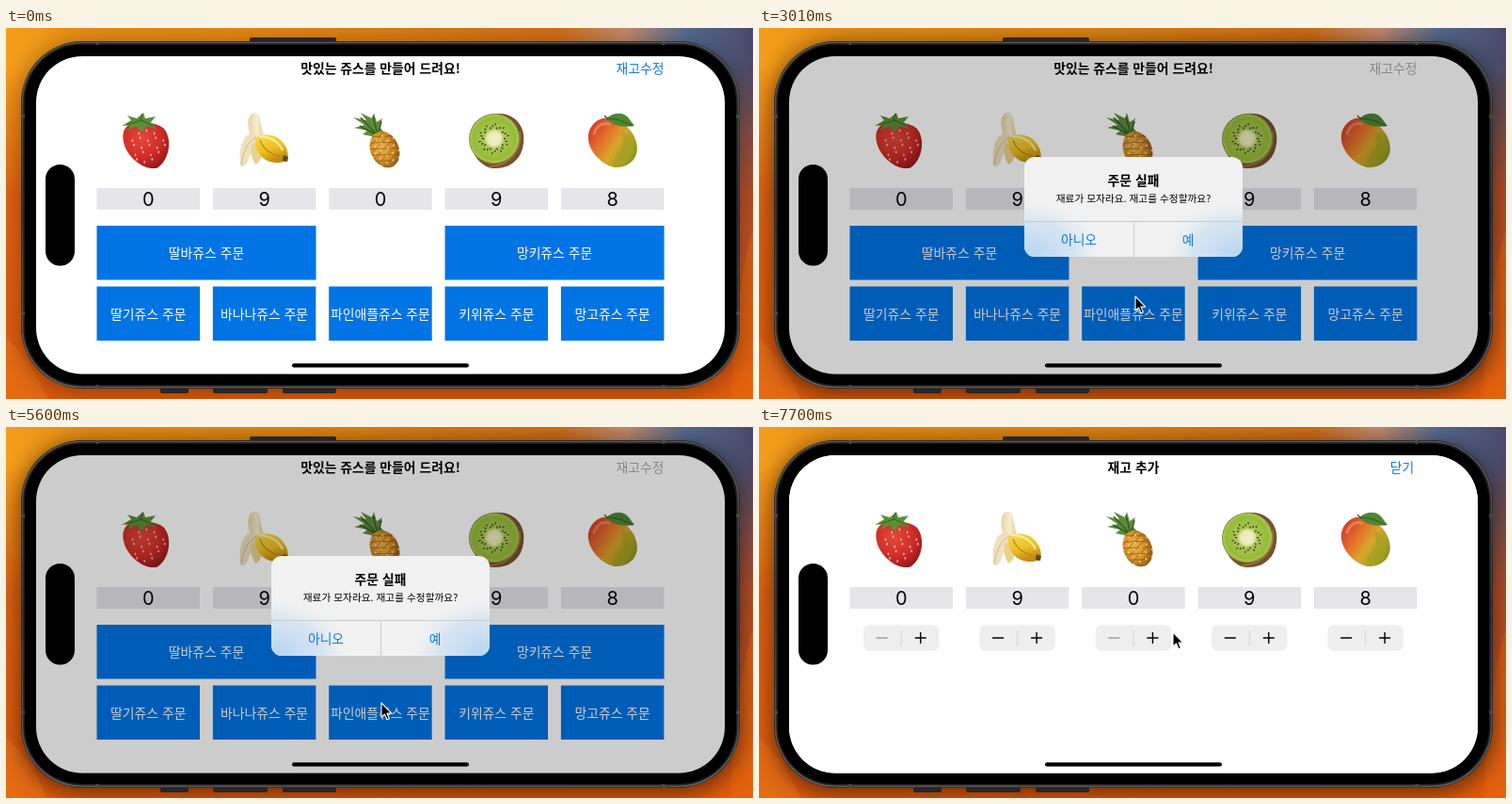
An HTML page that plays this animation: 794x394 px, repeating every 8000 ms.

```html
<!DOCTYPE html>
<html lang="ko">
<head>
<meta charset="utf-8">
<title>쥬스 주문</title>
<style>
html, body { margin: 0; width: 100%; height: 100%; overflow: hidden; background: #c4630f; }
svg { display: block; width: 794px; height: 394px; }
text { font: 13.85px "Noto Sans CJK KR", "Noto Sans CJK", sans-serif; text-anchor: middle; }
.bold { font-weight: 600; }
.num { font: 20px Inter, sans-serif; }
.btn { fill: #0074e4; }
.lbl { fill: #fff; }
.link { fill: #0a7ae0; }
</style>
</head>
<body>
<svg viewBox="0 0 794 394">
  <defs>
    <linearGradient id="wall" x2="1">
      <stop offset="0" stop-color="#f59d1c"/><stop offset=".12" stop-color="#e58c15"/>
      <stop offset=".45" stop-color="#dc8212"/><stop offset=".74" stop-color="#cf6d18"/>
      <stop offset=".83" stop-color="#c38a6c"/><stop offset=".91" stop-color="#566a90"/>
      <stop offset="1" stop-color="#4a4868"/>
    </linearGradient>
    <linearGradient id="low" x2="0" y2="1">
      <stop offset=".1" stop-color="#d9570d" stop-opacity="0"/><stop offset=".45" stop-color="#d8500f" stop-opacity=".75"/>
      <stop offset="1" stop-color="#e25c0c"/>
    </linearGradient>
    <linearGradient id="rim" x2="0" y2="1">
      <stop offset="0" stop-color="#5a5a5c"/><stop offset=".5" stop-color="#3a3a3c"/><stop offset="1" stop-color="#66605c"/>
    </linearGradient>
    <radialGradient id="red" cx=".4" cy=".35" r=".7">
      <stop offset="0" stop-color="#e5483c"/><stop offset=".6" stop-color="#cf2c28"/><stop offset="1" stop-color="#961a1c"/>
    </radialGradient>
    <linearGradient id="peel" x2=".4" y2="1">
      <stop offset="0" stop-color="#f7dc55"/><stop offset=".6" stop-color="#eebf22"/><stop offset="1" stop-color="#c38c14"/>
    </linearGradient>
    <linearGradient id="flesh" x2="1">
      <stop offset="0" stop-color="#e4d2a8"/><stop offset=".5" stop-color="#f8edcf"/><stop offset="1" stop-color="#dcc592"/>
    </linearGradient>
    <radialGradient id="pine" cx=".4" cy=".4" r=".65">
      <stop offset="0" stop-color="#edb64a"/><stop offset=".6" stop-color="#d4902a"/><stop offset="1" stop-color="#8d561a"/>
    </radialGradient>
    <radialGradient id="kiwi">
      <stop offset="0" stop-color="#f3f0cb"/><stop offset=".27" stop-color="#e9ebb5"/><stop offset=".42" stop-color="#a9c552"/>
      <stop offset=".85" stop-color="#94bb35"/><stop offset="1" stop-color="#b5c860"/>
    </radialGradient>
    <linearGradient id="mango" x1=".1" y1=".2" x2=".9" y2=".75">
      <stop offset="0" stop-color="#d6452a"/><stop offset=".35" stop-color="#e5772a"/>
      <stop offset=".6" stop-color="#d9a52a"/><stop offset="1" stop-color="#8f9a22"/>
    </linearGradient>
    <radialGradient id="tint">
      <stop offset="0" stop-color="#b9d6f1"/><stop offset=".6" stop-color="#cfe1f2" stop-opacity=".8"/><stop offset="1" stop-color="#e8eef3" stop-opacity="0"/>
    </radialGradient>
    <filter id="soft" x="-10%" y="-20%" width="120%" height="140%"><feGaussianBlur stdDeviation="11"/></filter>
    <clipPath id="screen"><rect x="32" y="30" width="732" height="337.5" rx="49"/></clipPath>
    <clipPath id="card"><rect x="282" y="137" width="232" height="106" rx="11"/></clipPath>
    <g id="stock"></g>
  </defs>

  <rect width="794" height="394" fill="url(#wall)"/>
  <rect width="794" height="394" fill="url(#low)"/>
  <path d="M0 330Q26 352 44 394H0Z" fill="#e8791c" opacity=".5"/>
  <path d="M794 215Q778 260 770 394H794Z" fill="#e8690f" opacity=".5"/>
  <rect id="shadow" x="14" y="16" width="768" height="374" rx="66" filter="url(#soft)"/>

  <g fill="#2c2522">
    <rect x="259" y="10" width="92" height="8" rx="2"/>
    <rect x="164" y="380" width="30" height="8" rx="2"/>
    <rect x="220" y="380" width="58" height="8" rx="2"/>
    <rect x="294" y="380" width="57" height="8" rx="2"/>
  </g>
  <rect x="16" y="14" width="764" height="369" rx="65" fill="#1d1d1f"/>
  <rect x="17.5" y="15.5" width="761" height="366" rx="63.5" fill="none" stroke="url(#rim)" stroke-width="1.6"/>
  <rect x="20" y="18" width="756" height="361" rx="61"/>
  <path d="M97 14v4M699 14v4M97 379v4M699 379v4M16 94h4M776 94h4M16 303h4M776 303h4" stroke="#4a4a4a" stroke-width="3"/>

  <g clip-path="url(#screen)">
    <rect x="32" y="30" width="732" height="338" fill="#fff"/>
    <text class="bold" x="398" y="47.8">맛있는 쥬스를 만들어 드려요!</text>
    <text id="edit" x="674" y="47.8">재고수정</text>
    <use href="#stock"/>
    <g id="orders"></g>
    <rect id="dim" x="32" y="30" width="732" height="338"/>
    <g id="alert">
      <g clip-path="url(#card)">
        <rect x="282" y="137" width="232" height="106" fill="#f1f1f1"/>
        <ellipse cx="290" cy="240" rx="75" ry="58" fill="url(#tint)"/>
        <ellipse cx="506" cy="240" rx="75" ry="58" fill="url(#tint)"/>
        <rect id="press" y="206" width="116" height="37"/>
        <path d="M282 205.5H514M398.5 205.5V243" stroke="#c9cbcd"/>
      </g>
      <text class="bold" x="398" y="166.5">주문 실패</text>
      <text x="398" y="184.8" style="font-size:10.7px">재료가 모자라요. 재고를 수정할까요?</text>
      <text class="link" x="340" y="229.5">아니오</text>
      <text class="link" x="456" y="229.5">예</text>
    </g>
    <g id="sheet">
      <rect x="32" y="30" width="732" height="338" fill="#fff"/>
      <text class="bold" x="398" y="47.8">재고 추가</text>
      <text class="link" x="683.5" y="47.8">닫기</text>
      <use href="#stock"/>
      <g id="steppers"></g>
    </g>
  </g>
  <rect x="42" y="145" width="31" height="107.5" rx="15.5"/>
  <rect x="304" y="356.3" width="188" height="4.2" rx="2.1"/>
  <path id="cursor" d="M0 0V15.2L3.5 12L6 17.8L8.4 16.8L6 11.1H10.8Z" stroke="#fff" stroke-width="1.1" stroke-linejoin="round"/>
</svg>
<script>
const $ = id => document.getElementById(id);
const clamp = v => Math.max(0, Math.min(1, v));
const smooth = p => p * p * (3 - 2 * p);
const inOut = p => p < .5 ? 2 * p * p : 1 - 2 * (1 - p) ** 2;
const out = p => 1 - (1 - p) ** 3;
const ramp = (t, start, length, ease) => ease(clamp((t - start) / length));
const mix = (a, b, p) => a + (b - a) * p;
const range = (n, f) => Array.from({ length: n }, (_, i) => f(i)).join('');

const COUNTS = [0, 9, 0, 9, 8];
const colX = i => 96.5 + 123.35 * i;

function strawberry() {
  const seeds = range(26, i => {
    const row = Math.floor(i / 5), x = 133 + (i % 5) * 8.2 + row * 1.5, y = 109 + row * 7.6 + (i % 2) * 3;
    const inside = ((x - 150) / 20) ** 2 + ((y - 124) / 21) ** 2 < 1;
    return inside ? `<ellipse cx="${x}" cy="${y}" rx=".9" ry="1.4" fill="#f0b79a"/>` : '';
  });
  return `<path d="M128 105C136 98 160 99 168 107C177 118 174 140 161 148.5C148 152 130 139 125.500 123C123.500 116 124 109 128 105Z" fill="url(#red)"/>${seeds}
    <path d="M123 104L133 98L129 93L139 96L146 90L148 96L159 94L154 100L160 107L149 104L144 111L139 104L130 109L132 103Z" fill="#5d8f35"/>
    <path d="M128 103L144 98L156 104M143 98L145 91" stroke="#38682a" stroke-width="1.2" fill="none"/>`;
}

function banana() {
  return `<path d="M262 122C256 104 256 95 261 91C266 88 270 91 270 98L276 124Z" fill="url(#flesh)"/>
    <path d="M263 111C252 112 247 127 249 146C252 149 256 146 258 139C261 130 267 122 270 117Z" fill="#eee0bd"/>
    <path d="M250 145C252 131 257 121 266 116" fill="none" stroke="#cfb681"/>
    <path d="M263 122C258 128 260 136 265 145C271 142 273 134 273 128Z" fill="#ead28e"/>
    <path d="M265 117C274 110 290 113 296 124C300 130 301 138 298 141C290 145 277 143 271 136C267 131 264 124 265 117Z" fill="url(#peel)"/>
    <path d="M270 119C274 130 284 136 297 137" fill="none" stroke="#ba8b18" stroke-width="1.3"/>
    <path d="M269 115C281 115 290 121 294 130" fill="none" stroke="#fff0a0" stroke-width="2"/>
    <path d="M295 135L300 137L299 142L294 141Z" fill="#594b1b"/>`;
}

function pineapple() {
  const lines = range(6, i => `<path d="M-17 ${i * 7 - 22}L17 ${i * 7 - 8}M17 ${i * 7 - 22}L-17 ${i * 7 - 8}"/>`);
  const dots = range(20, i => `<circle cx="${(i % 4) * 7 - 10.5 + Math.floor(i / 4) % 2 * 3}" cy="${Math.floor(i / 4) * 7 - 14}" r="1" fill="#f7d277"/>`);
  return `<path d="M394 116L379 113L384 109L370 106L381 103L369 95L383 98L377 90L389 96L391 90L394 100L400 96L397 105L402 111Z" fill="#5f8b39"/>
    <path d="M393 113L376 104M394 113L377 95M395 113L390 94M396 112L399 99" stroke="#2f5e29" stroke-width="1.5"/>
    <g transform="translate(402.500 129) rotate(-24)"><clipPath id="fruit"><ellipse rx="15" ry="20"/></clipPath>
    <ellipse rx="15" ry="20" fill="url(#pine)"/><g clip-path="url(#fruit)"><g stroke="#8a551a" stroke-width=".8" opacity=".75">${lines}</g>${dots}</g></g>`;
}

function kiwi() {
  const seeds = range(30, i => {
    const a = i * Math.PI / 15, r = 11.5 + (i % 3) * 1.9;
    return `<ellipse cx="${r}" rx="1.3" ry=".65" fill="#29301a" transform="rotate(${a * 180 / Math.PI})"/>`;
  });
  return `<path d="M496 110C502 93 520 87 535 93C548 99 553 112 549 128C545 143 532 150 517 149C501 146 491 129 496 110Z" fill="#76512c"/>
    <path d="M546 110C549 130 535 146 514 147" fill="none" stroke="#92703f" stroke-width="2"/>
    <ellipse cx="519" cy="117.500" rx="26.500" ry="26" fill="url(#kiwi)" stroke="#8a9140" transform="rotate(-25 519 117.500)"/>
    <g transform="translate(518.500 117.500)">${seeds}</g>`;
}

function mango() {
  return `<path d="M619 113C621 100 634 92 646 97C660 101 671 114 671 129C670 142 659 149 646 148C631 144 617 128 619 113Z" fill="url(#mango)"/>
    <path d="M655 110C671 117 671 140 654 147C640 146 648 137 655 128C659 122 652 116 655 110Z" fill="#a5a322" opacity=".65"/>
    <path d="M625 112C628 103 635 100 641 102" fill="none" stroke="#f09a72" stroke-width="3" stroke-linecap="round" opacity=".6"/>
    <path d="M638 96C646 89 657 89 662 96L668 104C656 106 645 104 638 96Z" fill="#4f8732"/>
    <path d="M639 96Q652 96 666 104M640 97L636 93" stroke="#2e5c25" stroke-width="1.2" fill="none"/>`;
}

$('stock').innerHTML = strawberry() + banana() + pineapple() + kiwi() + mango() + COUNTS.map((n, i) =>
  `<rect x="${colX(i)}" y="170" width="109.500" height="23" fill="#e5e5ea"/>
   <text class="num" x="${colX(i) + 54.75}" y="188.700">${n}</text>`).join('');

const button = (x, y, w, label, id = '') =>
  `<rect class="btn" x="${x}" y="${y}" width="${w}" height="57.500"/>
   <text class="lbl" ${id && `id="${id}"`} x="${x + w / 2}" y="${y + 34}">${label} 주문</text>`;
$('orders').innerHTML =
  button(colX(0), 210, 233, '딸바쥬스') + button(colX(3), 210, 233, '망키쥬스') +
  ['딸기쥬스', '바나나쥬스', '파인애플쥬스', '키위쥬스', '망고쥬스']
    .map((s, i) => button(colX(i), 274.5, 109.5, s, i === 2 ? 'pressed' : '')).join('');

$('steppers').innerHTML = COUNTS.map((n, i) => `<g transform="translate(${colX(i) + 54.75} 224)" stroke-width="1.4">
  <rect x="-40.300" y="-13.800" width="80.500" height="27.500" rx="6.500" fill="#eeeeef"/>
  <path d="M0 -8V8" stroke="#d2d2d5" stroke-width="1"/>
  <path d="M-26.500 0H-14.500" stroke="${n ? '#000' : '#a0a0a2'}"/>
  <path d="M14.500 0H26.500M20.500 -6V6" stroke="#000"/></g>`).join('');

// time, x, y of the pointer tip
const PATH = [
  [530, 780, -20], [1330, 421, 176], [1540, 415, 187], [1640, 415, 187], [1960, 400, 283],
  [2100, 400, 281], [2240, 400, 285], [3510, 400, 285], [3850, 326, 243], [3990, 341, 241],
  [4200, 340, 241], [4480, 340, 241], [4690, 369, 256], [5050, 399, 292], [5600, 399, 293],
  [6020, 410, 200], [6180, 425, 176], [6440, 440, 218], [8001, 440, 218]
];

function pointer(t) {
  const i = PATH.findIndex(k => k[0] > t);
  if (i < 1) return null;
  const [a, b] = [PATH[i - 1], PATH[i]];
  const p = smooth((t - a[0]) / (b[0] - a[0]));
  return [mix(a[1], b[1], p), mix(a[2], b[2], p)];
}

const set = (id, attrs) => { for (const k in attrs) $(id).setAttribute(k, attrs[k]); };

function draw(t) {
  const again = t >= 5200;
  const shown = again ? ramp(t, 5220, 360, out) : ramp(t, 2480, 480, out);
  const gone = ramp(t, again ? 6580 : 4575, 300, inOut);
  const on = shown * (1 - gone);
  const scale = mix(1.18, 1, shown);
  set('dim', { opacity: .2 * on });
  set('alert', { opacity: on, transform: `translate(398 190) scale(${scale}) translate(-398 -190)` });
  set('edit', { fill: `rgb(${mix(10, 168, on)},${mix(122, 168, on)},${mix(224, 168, on)})` });
  set('shadow', { opacity: mix(.3, .5, ramp(t, 2440, 100, smooth)) });

  const no = t >= 4330 && t < 4600, yes = t >= 6570 && t < 6650;
  set('press', { x: yes ? 398 : 282, opacity: no || yes ? .07 : 0 });
  const tap = (t >= 2440 && t < 2520) || (t >= 5230 && t < 5300);
  set('pressed', { opacity: tap ? .5 : 1 });

  const s = Math.max(0, t - 6900) / 1000 * 11;
  const drop = t < 7690 ? 340 * (1 + s) * Math.exp(-s) : 0;
  set('sheet', { transform: `translate(0 ${drop})`, visibility: t > 6900 ? 'visible' : 'hidden' });

  const tip = pointer(t);
  set('cursor', { visibility: tip ? 'visible' : 'hidden', transform: `translate(${tip || '0 0'})` });
}

const start = performance.now();
function tick() {
  draw((performance.now() - start) % 8000);
  requestAnimationFrame(tick);
}
tick();
</script>
</body>
</html>
```
